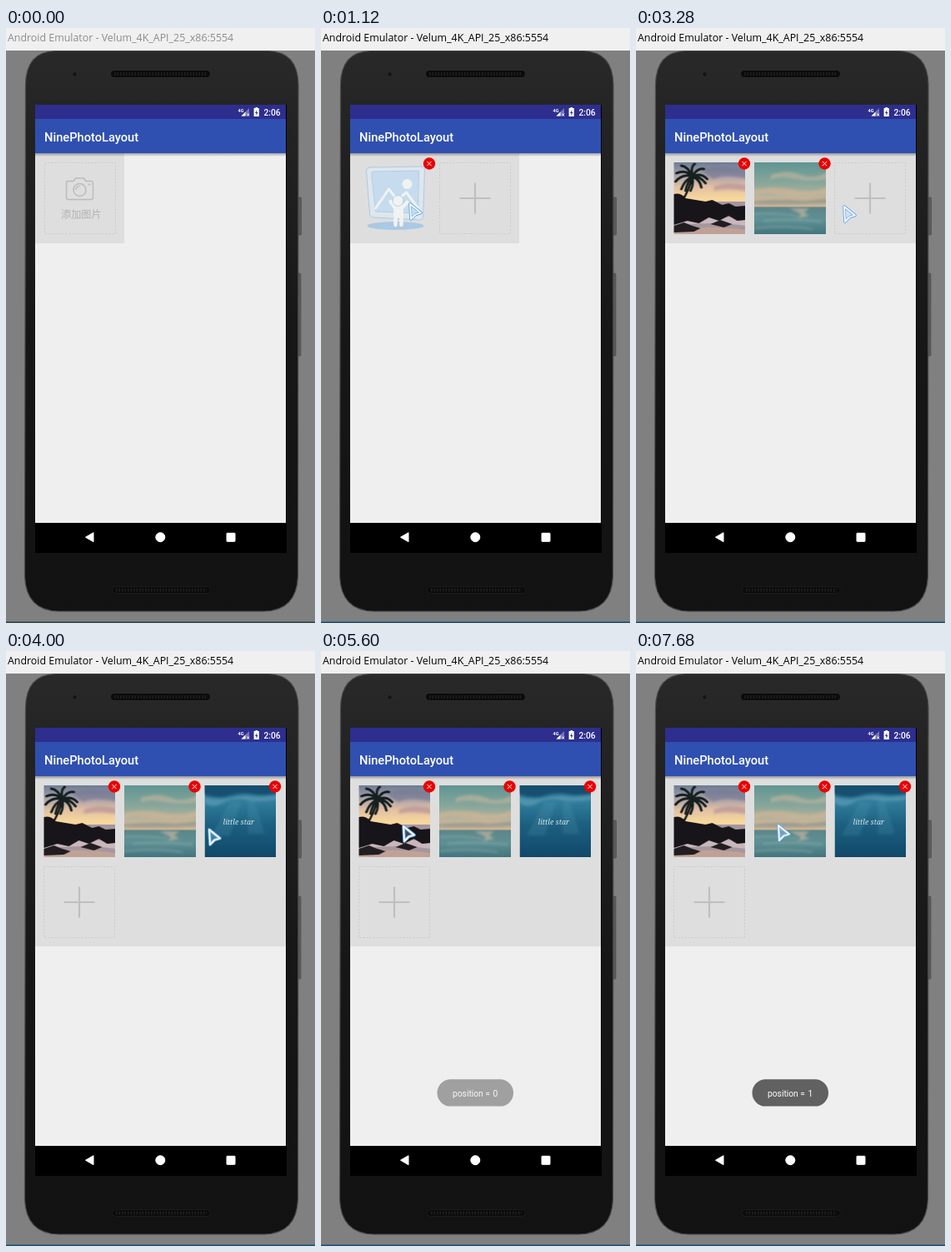
These frames come from a looping animation (371 by 713 pixels, 8000 ms). An HTML page:

```html
<!DOCTYPE html>
<html lang="en">
<head>
<meta charset="utf-8">
<title>NinePhotoLayout</title>
<style>
html, body { margin: 0; width: 100%; height: 100%; overflow: hidden; background: #808080; }
svg { display: block; }
#stage { position: absolute; left: 0; top: 0; }
text { font-family: Roboto, sans-serif; fill: #fff; }

/* One percent of the loop is one 80 ms tick. */
.anim { animation: 8s step-end infinite; }
.focus { animation-name: focus; }
.edge { animation-name: edge; }
.add { animation-name: add; }
.grid { animation-name: grid; }
.plus { animation-name: plus; }
.item1 { animation-name: item1; }
.photo1 { animation-name: photo1; }
.item2 { animation-name: item2; }
.photo2 { animation-name: photo2; }
.item3 { animation-name: item3; }
.photo3 { animation-name: photo3; }
.toast { animation-name: toast; }
.zero { animation-name: zero; }
.one { animation-name: one; }
.cursor { animation-name: cursor; }

@keyframes focus { 0% { fill: #8c8c8c } 8%, to { fill: #000 } }
@keyframes edge { 0% { fill: #4c5c5c } 8%, to { fill: #2a6f9c } }
@keyframes add { 0% { opacity: 1 } 14%, to { opacity: 0 } }
@keyframes grid {
  0% { width: 107px; height: 108px }
  14% { width: 203px; height: 108px }
  26% { width: 301px; height: 108px }
  43%, to { width: 301px; height: 204px }
}
@keyframes plus {
  0% { opacity: 0; transform: translate(142px, 161px) }
  14% { opacity: 1; transform: translate(142px, 161px) }
  26% { opacity: 1; transform: translate(238px, 161px) }
  43%, to { opacity: 1; transform: translate(45px, 258px) }
}
@keyframes item1 { 0% { opacity: 0 } 14%, to { opacity: 1 } }
@keyframes photo1 { 0% { opacity: 0 } 17%, to { opacity: 1 } }
@keyframes item2 { 0% { opacity: 0 } 26%, to { opacity: 1 } }
@keyframes photo2 { 0% { opacity: 0 } 33%, to { opacity: 1 } }
@keyframes item3 { 0% { opacity: 0 } 43%, to { opacity: 1 } }
@keyframes photo3 { 0% { opacity: 0 } 45%, to { opacity: 1 } }
@keyframes toast {
  0% { opacity: 0 } 64% { opacity: .3 } 70% { opacity: .56 }
  71% { opacity: .82 } 72%, to { opacity: 1 }
}
@keyframes zero {
  0% { opacity: 1 } 90% { opacity: .7 } 91% { opacity: .4 } 92% { opacity: .15 } 93%, to { opacity: 0 }
}
@keyframes one {
  0% { opacity: 0 } 90% { opacity: .3 } 91% { opacity: .6 } 92% { opacity: .85 } 93%, to { opacity: 1 }
}
@keyframes cursor {
  0% { opacity: 0; transform: translate(125px, 380px) }
  1% { opacity: 1; transform: translate(125px, 380px) }
  2% { opacity: 1; transform: translate(125px, 380px); animation-timing-function: steps(6) }
  8% { opacity: 1; transform: translate(107px, 211px) }
  17% { opacity: 1; transform: translate(114px, 211px) }
  18% { opacity: 1; transform: translate(122px, 211px) }
  20% { opacity: 1; transform: translate(122px, 211px); animation-timing-function: steps(5) }
  25% { opacity: 1; transform: translate(193px, 209px) }
  33% { opacity: 1; transform: translate(224px, 211px) }
  34% { opacity: 1; transform: translate(250px, 214px) }
  42% { opacity: 1; transform: translate(260px, 214px) }
  50% { opacity: 1; transform: translate(244px, 214px) }
  58% { opacity: 1; transform: translate(244px, 214px); animation-timing-function: steps(5) }
  63% { opacity: 1; transform: translate(99px, 210px) }
  75% { opacity: 1; transform: translate(104px, 210px) }
  76% { opacity: 1; transform: translate(104px, 210px); animation-timing-function: steps(4) }
  80% { opacity: 1; transform: translate(174px, 209px) }
  96%, to { opacity: 1; transform: translate(171px, 209px) }
}
</style>
</head>
<body>
<svg id="stage" width="371" height="713" viewBox="0 0 371 713">
  <defs>
    <linearGradient id="body" x2="0" y2="1">
      <stop stop-color="#292929"/><stop offset=".14" stop-color="#232323"/>
      <stop offset=".5" stop-color="#171717"/><stop offset="1" stop-color="#121212"/>
    </linearGradient>
    <linearGradient id="shade" x2="0" y2="1">
      <stop stop-color="#000" stop-opacity=".32"/><stop offset="1" stop-color="#000" stop-opacity="0"/>
    </linearGradient>
    <linearGradient id="dusk" x2="0" y2="1">
      <stop stop-color="#6d7c96"/><stop offset=".18" stop-color="#a79fa9"/>
      <stop offset=".34" stop-color="#e2c0a4"/><stop offset=".5" stop-color="#f6d79c"/>
    </linearGradient>
    <linearGradient id="day" x2="0" y2="1">
      <stop stop-color="#5f9593"/><stop offset=".3" stop-color="#8aa79b"/>
      <stop offset=".5" stop-color="#c2b49a"/><stop offset=".61" stop-color="#d2b393"/>
      <stop offset=".63" stop-color="#5b868a"/><stop offset=".8" stop-color="#5f9094"/>
      <stop offset="1" stop-color="#41757d"/>
    </linearGradient>
    <linearGradient id="deep" x2="0" y2="1">
      <stop stop-color="#1f6585"/><stop offset=".25" stop-color="#2f7b9a"/>
      <stop offset=".55" stop-color="#1c5f80"/><stop offset="1" stop-color="#114869"/>
    </linearGradient>
    <filter id="soft"><feGaussianBlur stdDeviation="1.5"/></filter>

    <g id="delete">
      <circle r="7.200" fill="#ea0000"/>
      <path d="M-2.600-2.600 2.600 2.600M2.600-2.600-2.600 2.600" stroke="#fff" stroke-width=".9"/>
    </g>
    <rect id="dash" x=".5" y=".5" width="85" height="85" fill="none" stroke="#cacaca" stroke-dasharray="2 2"/>

    <g id="holder" stroke-linejoin="round" stroke-linecap="round">
      <ellipse cx="44" cy="76" rx="34" ry="5" fill="var(--shadow)"/>
      <path d="M13 6 76 5Q79 5 79 9L77 65Q77 69 73 69L18 66Q14 66 13 62L9 11Q9 6 13 6Z" fill="var(--rim)" stroke="var(--line)"/>
      <path d="M17 11 72 10 71 61 20 59 15 13Z" fill="var(--fill)" stroke="var(--line)" stroke-width=".8"/>
      <path d="M20 55 36 32 46 45 57 36 71 55" fill="none" stroke="#f0f2f3" stroke-width="3"/>
      <path d="M44 54V75M51 54V75M43 54 38 47M52 54 58 48" stroke="#f0f2f3" stroke-width="4.500"/>
      <rect x="42" y="49" width="11" height="18" rx="4" fill="#f0f2f3"/>
      <circle cx="47" cy="46" r="6.500" fill="#f0f2f3" stroke="var(--line)" stroke-width=".8"/>
    </g>
    <path id="crack" d="M48 17 56 23 53 29 64 26 67 20" fill="none" stroke="#f0f0f0" stroke-width="3"/>
  </defs>

  <!-- Window -->
  <rect width="371" height="713" fill="#808080"/>
  <rect width="371" height="27" fill="#f0f0f0"/>
  <rect class="anim edge" y="711" width="371" height="1"/>
  <rect y="712" width="371" height="1" fill="#304747"/>
  <text class="anim focus" x="2" y="16" style="font:12.4px 'Open Sans', sans-serif">Android Emulator - Velum_4K_API_25_x86:5554</text>

  <!-- Phone -->
  <path d="M351 203h2.500q1 0 1 1v43q0 1-1 1H351ZM351 294h2q1 0 1 1v97q0 1-1 1h-2Z" fill="#5c5c5c" stroke="#484848" stroke-width=".6"/>
  <path d="M60 27.500H314Q350.500 28 351 68L350.500 657Q349 698 310 699H63Q24 698 22.500 657L23.500 68Q24 28 60 27.500Z" fill="url(#body)" stroke="#4a4a4a" stroke-width="1.200"/>
  <circle cx="82.500" cy="55.500" r="3" fill="#151515" stroke="#383838" stroke-width=".7"/>
  <g fill="#0b0b0b" stroke="#303030" stroke-width=".8">
    <rect x="125.500" y="50.500" width="120" height="9" rx="4.500"/>
    <rect x="127.500" y="669.500" width="118" height="8" rx="4" stroke="#202020"/>
  </g>
  <path d="M130 55H241M132 673.500H241" stroke="#202020" stroke-width="4" stroke-dasharray="1.500 2"/>

  <!-- Screen -->
  <rect x="35" y="92" width="302" height="537"/>
  <rect x="35" y="93" width="301" height="500" fill="#efefef"/>
  <rect class="anim grid" x="35" y="150" width="107" height="108" fill="#dedede"/>
  <rect x="35" y="92" width="301" height="17" fill="#2d2e8e"/>
  <rect x="35" y="109" width="301" height="41" fill="#2f50b0"/>
  <rect x="35" y="150" width="301" height="4" fill="url(#shade)"/>
  <text x="46" y="136" font-size="14.65" font-weight="500">NinePhotoLayout</text>
  <text x="309.500" y="104.500" font-size="10.25" font-weight="500">2:06</text>
  <text x="278.500" y="100.500" font-size="5.500" font-weight="700">4G</text>
  <path d="M292 96V105.500H282.500Z" fill="#fff" fill-opacity=".35"/>
  <path d="M287.500 100.500V105.500H282.500Z" fill="#fff"/>
  <path d="M289.500 102.500 292 105.500M292 102.500 289.500 105.500" stroke="#fff" stroke-width=".9"/>
  <path d="M299.500 95h2.500v1h1.800v10h-6.200V96h1.900Z" fill="#fff"/>
  <path d="M301.500 98 299 102h1.600l-.5 3 2.500-4H301Z" fill="#2d2e8e"/>
  <g fill="#fff" stroke="#fff" stroke-linejoin="round">
    <path d="M95.500 610.200 105 604.700V615.700Z"/>
    <circle cx="185.300" cy="610.200" r="5.500"/>
    <rect x="265" y="605.300" width="10" height="10" rx=".6"/>
  </g>

  <!-- Empty picker -->
  <g class="anim add">
    <use href="#dash" x="46" y="161"/>
    <g fill="none" stroke="#bcbcbc" stroke-width="1.500">
      <path d="M75 183.500h6l2.500-3.500h10l2.500 3.500h6q2.500 0 2.500 2.500v17q0 2.500-2.500 2.500H75q-2.500 0-2.500-2.500v-17q0-2.500 2.500-2.500Z" stroke-linejoin="round"/>
      <circle cx="88.500" cy="194" r="7.500"/>
      <path d="M84 194a4.500 4.500 0 0 1 4.500-4.500M98.500 187.500h3"/>
    </g>
    <text x="66" y="228" style="font:12.2px 'Noto Sans CJK SC', 'Noto Sans CJK', sans-serif;fill:#b2b2b2">添加图片</text>
  </g>

  <g class="anim plus">
    <use href="#dash"/>
    <path d="M43 24.500V61.500M24.500 43H61.500" stroke="#bfbfbf" stroke-width="2.200"/>
  </g>

  <!-- Palm beach -->
  <g class="anim item1">
    <g transform="translate(45.500 161)" style="--line:#a9cbe6;--rim:#dfe6ec;--fill:#c6dbed;--shadow:#a9c9e4">
      <use href="#holder"/>
      <circle cx="58" cy="26" r="6" fill="#f0f2f3"/>
    </g>
    <svg class="anim photo1" x="45.500" y="161" width="85.500" height="86">
      <rect width="86" height="86" fill="url(#dusk)"/>
      <g filter="url(#soft)">
        <path d="M34 8Q56 2 90 8V20Q60 13 48 20 38 16 34 8Z" fill="#6f7690" opacity=".6"/>
        <path d="M48 29Q66 22 90 28V35Q64 30 48 34Z" fill="#b08a94" opacity=".6"/>
      </g>
      <rect y="47" width="86" height="39" fill="#a596a0"/>
      <path d="M0 68Q34 60 86 68V76Q50 70 0 76Z" fill="#c9b7ba"/>
      <path d="M0 82Q34 74 86 81V86H0Z" fill="#c0a294"/>
      <path d="M0 38Q8 36 14 43L26 45 38 47 46 45 58 51 66 49 74 53 86 52V69L76 70 66 64 54 70 42 66 30 73 16 70 0 75Z" fill="#171519"/>
      <path d="M0 76 12 72 22 76 32 79 24 83 0 84ZM44 74 56 69 70 74 60 78Z" fill="#211d21"/>
      <path d="M10 46Q18 34 22 18" fill="none" stroke="#121416" stroke-width="2.400"/>
      <path d="M22 17Q14 8 3 13M22 17Q11 13 2 23M22 17Q13 21 9 32M22 17Q24 27 20 34M22 17Q31 20 33 30M22 17Q32 12 40 20M22 17Q28 6 36 8M22 17Q20 5 25 2M22 17Q17 5 9 4M22 17Q16 24 14 34M22 17Q30 15 38 25" fill="none" stroke="#16211f" stroke-width="3" stroke-linecap="round"/>
    </svg>
    <use href="#delete" x="130" y="162.500"/>
  </g>

  <!-- Sea horizon -->
  <g class="anim item2">
    <g transform="translate(142 161)" style="--line:#b4b4b4;--rim:#d8d8d8;--fill:#c0c0c0;--shadow:#969696">
      <use href="#holder"/>
      <use href="#crack"/>
    </g>
    <svg class="anim photo2" x="142" y="161" width="85.500" height="86">
      <rect width="86" height="86" fill="url(#day)"/>
      <g filter="url(#soft)">
        <path d="M20 15Q40 8 56 15T90 10V20Q66 24 48 20T20 21Z" fill="#b9b39d" opacity=".7"/>
        <path d="M-4 34Q24 27 48 33T90 28V38Q54 43 30 39T-4 42Z" fill="#ccb697" opacity=".7"/>
        <path d="M-4 47Q34 43 60 46L90 43V49Q50 51-4 50Z" fill="#8a958c" opacity=".7"/>
        <path d="M42 55H66L60 60 66 64 52 67 56 62Z" fill="#d2baa0" opacity=".6"/>
        <path d="M-4 62Q30 60 52 64M10 70Q40 67 82 71M0 79Q36 75 70 80" fill="none" stroke="#8fb0ac"/>
      </g>
    </svg>
    <use href="#delete" x="226.500" y="162.500"/>
  </g>

  <!-- Under water -->
  <g class="anim item3">
    <g transform="translate(238.500 161)" style="--line:#b4b4b4;--rim:#d8d8d8;--fill:#c0c0c0;--shadow:#969696">
      <use href="#holder"/>
      <use href="#crack"/>
    </g>
    <svg class="anim photo3" x="238.500" y="161" width="85.500" height="86">
      <rect width="86" height="86" fill="url(#deep)"/>
      <g filter="url(#soft)">
        <path d="M-4-4H90V9Q70 13 57 10T30 12-4 9Z" fill="#174f70"/>
        <path d="M-4 13Q16 19 30 15T57 13 90 11V17Q66 21 49 18T20 22-4 18Z" fill="#5d9db5" opacity=".7"/>
        <path d="M31 19H44L30 60H8ZM52 19H60L72 58H52Z" fill="#5d9db5" opacity=".2"/>
      </g>
      <text x="22" y="47" style="font:italic 8.800px 'Noto Serif', serif;fill:#d8e7ed">little star</text>
    </svg>
    <use href="#delete" x="323" y="162.500"/>
  </g>

  <g class="anim toast">
    <rect x="139.500" y="513.300" width="91.500" height="32.300" rx="16" fill="#616161"/>
    <g font-size="10.25">
      <text x="158" y="533.700">position =</text>
      <text class="anim zero" x="206.500" y="533.700">0</text>
      <text class="anim one" x="206.500" y="533.700">1</text>
    </g>
  </g>

  <g class="anim cursor" stroke-linejoin="round">
    <path d="M0 0 13 10.500 6.500 12.500 1 18Z" fill="none" stroke="#64a9e6" stroke-width="3.600"/>
    <path d="M0 0 13 10.500 6.500 12.500 1 18Z" fill="#d6e8f7" fill-opacity=".25" stroke="#f2f8fd" stroke-width="1.800"/>
  </g>
</svg>
</body>
</html>
```
